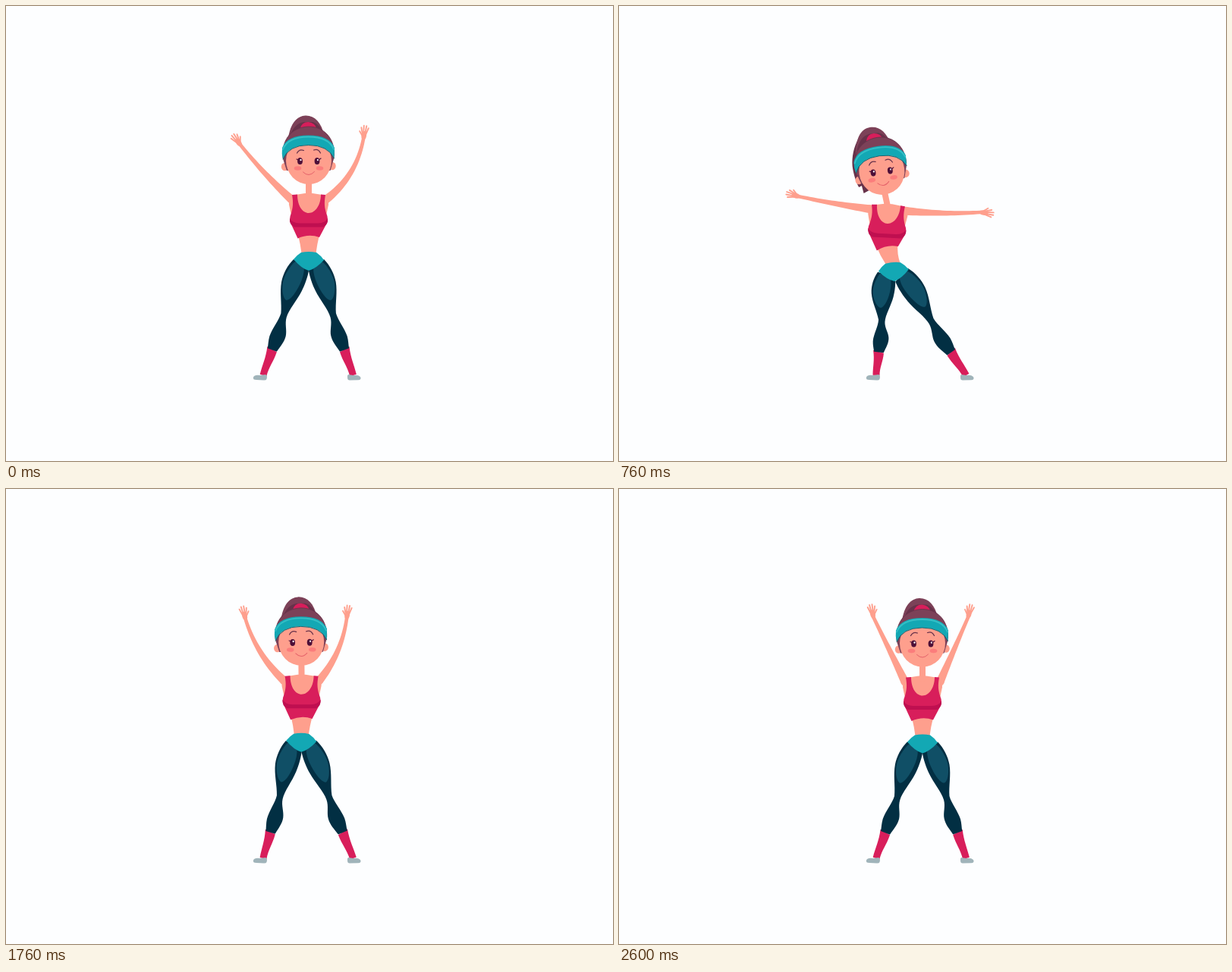
Write an HTML page with a canvas that moves like this. It is 800x600 px and loops after 2.68 s.

```html
<!DOCTYPE html>
<html lang="en">
<head>
<meta charset="utf-8">
<title>Side sway workout</title>
<style>
  html, body { margin: 0; width: 100%; height: 100%; overflow: hidden; background: #fdfeff; }
  canvas { display: block; }
</style>
</head>
<body>
<canvas id="stage" width="800" height="600"></canvas>
<script>
const ctx = document.getElementById('stage').getContext('2d');
const LOOP = 2680, STEP = 40, LAST = 2600;
const RAD = Math.PI / 180;

const SKIN = '#fe9f8d', PINK = '#d81e5b', PINK_DARK = '#bf0f50';
const TEAL = '#13a8b4', TEAL_LIGHT = '#35bfc6', TEAL_DARK = '#11616f';
const LEG = '#022f43', LEG_LIGHT = '#104f66', SHOE = '#a0b4ba';
const HAIR = '#7c4158', HAIR_DARK = '#67324a', EYE = '#4d0f38';

// Pose tracks, one value per key time.
const keys = [0, 200, 400, 580, 760, 1000, 1140, 1400, 1700, 1900, 2080, 2280, 2600];
const bodyTracks = {
  x:     [399, 377, 358.5, 352, 361, 390, 408, 406.5, 391, 388, 391, 398, 400],
  y:     [324, 338, 336, 325, 338, 337, 327, 341, 325, 317, 322, 324, 323.5],
  lean:  [0, -7, -10, -13, -7, 10, 14, 8, 1, 0, 0, 0, 0],
  chest: [0, 4, 6, 7, 3, 0, -3, -3, 0, 0, 0, 0, 0],
  tilt:  [0, -6, -9, -10, -7.5, 4, 6, 2, 0, -1, 0, 0, 0],
  pony:  [0, .6, 1, 1.1, .9, 0, -.8, -.75, -.2, 0, 0, 0, 0]
};
const leftTracks = {
  angle: [47, 22, 17, 11, 10, -2, 0, 16, 52, 66, 63, 63, 64],
  reach: [98, 98, 98, 98, 96, 97, 97, 96, 96, 96, 96, 95, 95],
  sag:   [2, 4, 3, 2, 1, 0, -1, 2, 6, 7, 6, 3, 0],
  hand:  [52, 34, 25, 16, 14, 7, 5, 24, 68, 84, 80, 78, 77]
};
const rightTracks = {
  angle: [58.5, 22, 6, 0, -1, 9, 15, 47, 64, 68, 66, 66, 66.5],
  reach: [94, 100, 102, 100, 99, 93, 96, 90, 90, 90, 90, 92, 93],
  sag:   [9, 12, 9, 4, 2, 2, 3, 8, 7, 5, 4, 2, 0],
  hand:  [81, 50, 18, -4, -8, 3, 12, 65, 80, 82, 80, 78, 76]
};

// Tangent at a key; flat at turning points so that poses never overshoot.
function slope(v, i) {
  const a = Math.max(0, i - 1), b = Math.min(keys.length - 1, i + 1);
  if (a < i && b > i && (v[i] - v[a]) * (v[b] - v[i]) <= 0) return 0;
  return (v[b] - v[a]) / (keys[b] - keys[a]);
}

function sample(v, t) {
  let i = 0;
  while (i < keys.length - 2 && t >= keys[i + 1]) i++;
  const span = keys[i + 1] - keys[i], s = (t - keys[i]) / span;
  const s2 = s * s, s3 = s2 * s;
  return v[i] * (2 * s3 - 3 * s2 + 1) + v[i + 1] * (3 * s2 - 2 * s3) +
    span * (slope(v, i) * (s3 - 2 * s2 + s) + slope(v, i + 1) * (s3 - s2));
}

const poseAt = (tracks, t) =>
  Object.fromEntries(Object.entries(tracks).map(([name, v]) => [name, sample(v, t)]));

function turn(x, y, deg) {
  const c = Math.cos(deg * RAD), s = Math.sin(deg * RAD);
  return [x * c - y * s, x * s + y * c];
}

function fill(d, color) {
  ctx.fillStyle = color;
  ctx.fill(new Path2D(d));
}

function line(d, color, width) {
  ctx.strokeStyle = color;
  ctx.lineWidth = width;
  ctx.stroke(new Path2D(d));
}

function oval(x, y, rx, ry, color) {
  ctx.fillStyle = color;
  ctx.beginPath();
  ctx.ellipse(x, y, rx, ry, 0, 0, 2 * Math.PI);
  ctx.fill();
}

function within(x, y, deg, draw) {
  ctx.save();
  ctx.translate(x, y);
  ctx.rotate(deg * RAD);
  draw();
  ctx.restore();
}

function drawArm(side, neck, chest, arm) {
  const [ox, oy] = turn(side * 23, -13, chest);
  const sx = neck.x + ox, sy = neck.y + 20 + oy;
  const cos = Math.cos(arm.angle * RAD), sin = Math.sin(arm.angle * RAD);
  const wx = sx + side * cos * arm.reach, wy = sy - sin * arm.reach;
  const cx = (sx + wx) / 2 + side * sin * arm.sag * 2;
  const cy = (sy + wy) / 2 + cos * arm.sag * 2;
  const upper = [], lower = [];
  for (let i = 0; i <= 20; i++) {
    const t = i / 20, r = 1 - t;
    const x = r * r * sx + 2 * r * t * cx + t * t * wx;
    const y = r * r * sy + 2 * r * t * cy + t * t * wy;
    const dx = r * (cx - sx) + t * (wx - cx), dy = r * (cy - sy) + t * (wy - cy);
    const half = (2.3 + 3.2 * r ** 1.5) / Math.hypot(dx, dy);
    upper.push([x + dy * half, y - dx * half]);
    lower.unshift([x - dy * half, y + dx * half]);
  }
  ctx.fillStyle = SKIN;
  ctx.beginPath();
  upper.concat(lower).forEach(p => ctx.lineTo(...p));
  ctx.fill();
  oval(sx, sy, 5.4, 5.4, SKIN);

  ctx.save();
  ctx.translate(wx, wy);
  ctx.scale(side, 1);
  ctx.rotate(-arm.hand * RAD);
  oval(4, 0, 6, 3.3, SKIN);
  line('M5,-2 L14,-5 M6,-1 L17,-2 M6,1 L17,1.5 M5,2 L14.5,4.5', SKIN, 1.9);
  line('M2,-1 L9,-6.5', SKIN, 1.8);
  ctx.restore();
}

function drawLeg(side, hip, twist) {
  const [ox, oy] = turn(side * 17, 16, twist);
  const jx = hip.x + ox, jy = hip.y + oy;
  const dx = (side < 0 ? 339 : 457.5) - jx, dy = 487 - jy;
  const len = Math.hypot(dx, dy);
  ctx.save();
  ctx.transform(-side * dy / len, side * dx / len, dx / 153, dy / 153, jx, jy);
  fill('M-5.5,115 L8.5,118.5 C8,132 4,140 4.5,153 L-4.5,153 C-5,140 -3,130 -5.5,115Z', PINK);
  fill('M-4.6,-5 C-10,5 -12.5,17 -11.5,28 C-10,42 -3,55 -.5,68 C-.5,78 -6,90 -6.5,101' +
    'C-6.5,107 -5,112 -4.5,117 L8.3,118 C11,110 14.5,103 14,95 C13.5,87 8,80 8,71' +
    'C8,60 15,46 17.5,32 C19,24 20,12 18.6,2Z', LEG);
  fill('M-1.5,-3 C-7,5 -11,20 -9.3,30 C-7.5,40 -3,49 1.5,49.5' +
    'C7,48 12,34 13.5,18 C14,10 13,4 11,0Z', LEG_LIGHT);
  ctx.restore();
}

function drawShoes() {
  fill('M327,488 Q330,486 335,487 L342,486 Q345,487 343.5,492 Q343,493.5 340,493.5' +
    'L330,493 Q325,493 326,489.5Z', SHOE);
  fill('M451,486 L458,487 Q464,486 467,489 Q469,493 464,493.3 L453,493.5' +
    'Q450,493.5 450,490 Q449.5,487 451,486Z', SHOE);
}

function drawTorso(neck, hip, pose, twist) {
  const top = (x, y) => {
    const [px, py] = turn(x, y - 20, pose.chest);
    return `${neck.x + px},${neck.y + 20 + py} `;
  };
  const hem = (x, y) => {
    const [px, py] = turn(x, y, pose.lean * 1.1);
    return `${neck.x + px},${neck.y + 57 + py} `;
  };
  const belt = x => {
    const [px, py] = turn(x, 2, twist);
    return `${hip.x + px},${hip.y + py} `;
  };
  fill('M' + hem(-14, -3) + 'Q' + hem(-11, 9) + belt(-9.5) + 'L' + belt(9.5) +
    'Q' + hem(11, 9) + hem(14, -3) + 'Z', SKIN);
  fill('M' + top(-5, -1) + 'L' + top(-21, 1.5) + 'Q' + top(-27, 5) + top(-26, 14) +
    'L' + top(-23, 28) + top(23, 28) + top(26, 14) + 'Q' + top(27, 5) + top(21, 1.5) +
    'L' + top(5, -1) + 'Z', SKIN);

  const bust = 'M' + top(-22, 1) + 'L' + top(-15, .5) +
    'C' + top(-15, 16) + top(-8, 25) + top(0, 25) +
    'C' + top(9, 25) + top(16, 14) + top(16, .5) + 'L' + top(22, 1) +
    'C' + top(20, 12) + top(21, 18) + top(23, 25) + 'Q' + top(27, 34) + top(23, 40);
  fill(bust + 'L' + hem(14, 0) + 'Q' + hem(0, -5) + hem(-14.5, 1.5) + 'L' + top(-23, 40) +
    'Q' + top(-27, 34) + top(-23, 25) + 'C' + top(-21, 18) + top(-20, 12) + top(-22, 1) + 'Z', PINK);
  fill('M' + top(-25, 32) + 'Q' + top(-22, 38) + top(-12, 38.5) + 'L' + top(12, 38.5) +
    'Q' + top(22, 38) + top(25, 32) + 'Q' + top(26, 40) + top(19, 43.5) +
    'L' + top(-19, 43.5) + 'Q' + top(-26, 40) + top(-25, 32) + 'Z', PINK_DARK);
}

function drawPonytail(head, swing) {
  ctx.save();
  ctx.translate(head.x, head.y);
  ctx.scale(swing, 1);
  fill('M-10,-58 C-34,-58 -46,-26 -42,-4 C-40,6 -36,16 -33,20 L-29,18' +
    'L-26,28 L-18,24 L0,10 L10,-40Z', HAIR_DARK);
  ctx.restore();
}

function drawFace(blink) {
  line('M-15,-11 Q-12,-17 -6,-14.5 M7,-15 Q13,-17.5 16,-11', HAIR_DARK, 1.2);
  oval(-14, 9, 4.8, 2.8, '#fb7d7c');
  oval(15, 9, 4.8, 2.8, '#fb7d7c');
  line('M-7,14 Q.5,21.5 8,13.5', '#e5636b', 1);
  if (blink) {
    line('M-19,-2.5 Q-13,1.5 -7,-.5 M7,-1 Q13,1.5 19,-2.5', EYE, 1.9);
    return;
  }
  for (const x of [-11, 11.5]) {
    oval(x, -.5, 3.4, 4.5, EYE);
    oval(x + 1, -2, 1.1, 1.2, '#fff');
  }
  line('M-13,-2 L-15.5,-3 M13.5,-2 L16.5,-4', EYE, 1.2);
}

function drawHead(pose, blink) {
  ctx.save();
  ctx.translate(-pose.pony * 4, 0);
  fill('M-27,-28 C-24,-52 -14,-60 -4,-60.5 C8,-61 17,-52 21,-34Z', HAIR);
  fill('M-25,-32 Q-19,-50 -6,-52 L6,-52 Q16,-49 21,-34Z', HAIR_DARK);
  fill('M-11,-43 Q-9,-52 0,-52 Q9,-51 11,-43Z', PINK);
  ctx.restore();

  oval(-31, 7, 4.7, 5.3, SKIN);
  oval(31.5, 6, 4.7, 5.3, SKIN);
  fill('M-34,-5 C-35,-30 -22,-45 0,-46 C22,-46 36,-29 34,-5 L29,12 L-28.5,12Z', HAIR);
  line('M-34,-8 C-34,-30 -22,-45 0,-46 C22,-46 35,-29 34,-8', HAIR_DARK, .8);
  oval(.5, -1, 30, 31, SKIN);
  fill('M-34.5,-18 Q-28,-34.5 0,-34.5 Q28,-34.5 34.5,-18 L34,-4' +
    'Q26,-21.5 0,-21.5 Q-26,-21.5 -33.5,-3 Q-35.5,-10 -34.5,-18Z', TEAL);
  line('M-33.5,-16 Q-27,-32.5 0,-32.5 Q27,-32.5 33.5,-16', TEAL_LIGHT, 1.8);
  line('M-33.5,-3 Q-26,-21.5 0,-21.5 Q26,-21.5 34,-4', TEAL_DARK, .9);
  drawFace(blink);
}

function draw(t) {
  const pose = poseAt(bodyTracks, t);
  const hip = { x: pose.x, y: pose.y };
  const neck = { x: pose.x + pose.lean, y: pose.y - 76 };
  const head = { x: neck.x + pose.tilt - .5, y: neck.y - 43 };
  const twist = pose.lean * .7;

  ctx.fillStyle = '#fdfeff';
  ctx.fillRect(0, 0, 800, 600);
  ctx.lineCap = ctx.lineJoin = 'round';

  drawPonytail(head, pose.pony);
  drawArm(-1, neck, pose.chest, poseAt(leftTracks, t));
  drawArm(1, neck, pose.chest, poseAt(rightTracks, t));
  drawLeg(-1, hip, twist);
  drawLeg(1, hip, twist);
  drawShoes();
  drawTorso(neck, hip, pose, twist);
  within(hip.x, hip.y, twist, () =>
    fill('M-10,1 Q0,-1 10,1 Q16,5 20,11 Q10,22 0,25 Q-10,22 -20,10 Q-15,4 -10,1Z', TEAL));
  line(`M${neck.x},${neck.y + 2} L${head.x + .5 - pose.tilt * .4},${head.y + 24}`, SKIN, 8);
  within(head.x, head.y, pose.tilt, () => drawHead(pose, t >= 960 && t <= 1080));
}

function tick(now) {
  draw(Math.min(LAST, Math.floor(now % LOOP / STEP) * STEP));
  requestAnimationFrame(tick);
}

const start = performance.now();
const loop = () => tick0(performance.now() - start);
function tick0(elapsed) {
  draw(Math.min(LAST, Math.floor(elapsed % LOOP / STEP) * STEP));
  requestAnimationFrame(loop);
}
loop();
</script>
</body>
</html>
```
